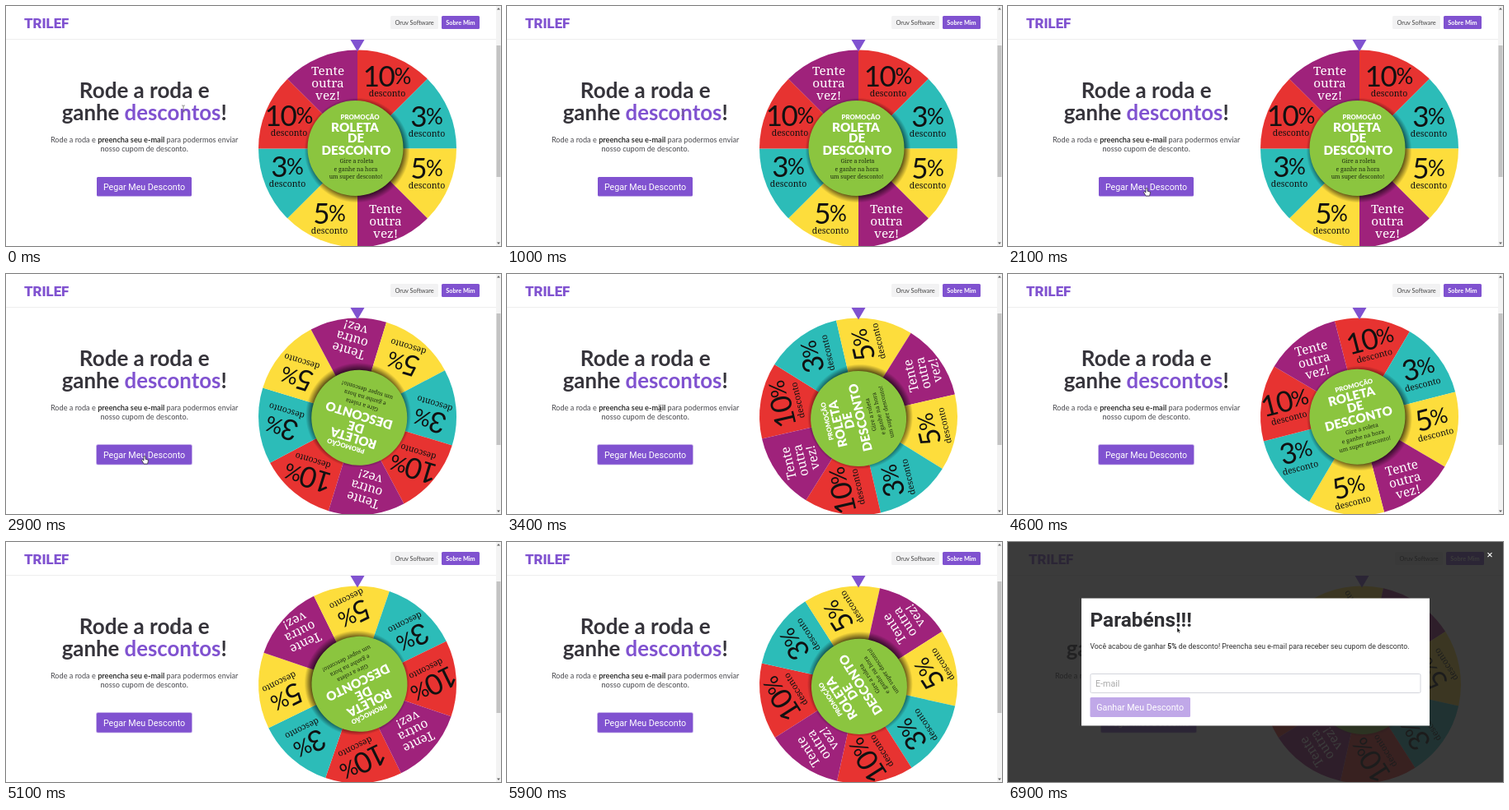
An HTML page that plays this animation: 600 px wide and 292 px high, repeating every 7000 ms.

```html
<!DOCTYPE html>
<html lang="pt-BR">
<head>
<meta charset="utf-8">
<title>Roleta de desconto</title>
<style>
  html, body { margin: 0; width: 100%; height: 100%; overflow: hidden; background: #fff; }
  svg { display: block; width: 600px; height: 292px; }
  text { white-space: pre; }
  .lato { font-family: Lato, sans-serif; }
  .roboto { font-family: Roboto, sans-serif; }
  .slab { font-family: "Noto Serif", serif; }
  .mid { text-anchor: middle; }
  .bold { font-weight: 700; }
  .black { font-weight: 900; }
</style>
</head>
<body>
<svg id="stage" viewBox="0 0 600 292"></svg>
<script>
const LOOP = 7000, MODAL_AT = 5900, MODAL_FADE = 300, CLICK_AT = 2300;
const PURPLE = '#8052d0', RED = '#e73331', TEAL = '#2cbcb8', YELLOW = '#fddd3c', PLUM = '#9f227b';
const INK = '#36343b', RADIUS = 120;

const text = (x, y, size, fill, cls, str) =>
  `<text x="${x}" y="${y}" font-size="${size}" fill="${fill}" class="${cls}">${str}</text>`;
const rect = (x, y, w, h, fill, extra = '') =>
  `<rect x="${x}" y="${y}" width="${w}" height="${h}" fill="${fill}" ${extra}/>`;

function slice(color, i) {
  const rim = a => `${RADIUS * Math.sin(a)} ${-RADIUS * Math.cos(a)}`;
  const a = i * Math.PI / 4;
  return `<path d="M0 0L${rim(a)}A${RADIUS} ${RADIUS} 0 0 1 ${rim(a + Math.PI / 4)}Z" fill="${color}"/>`;
}

const prize = (value, x, y) =>
  text(x, y, 35, '#111', 'lato mid',
    `<tspan letter-spacing="-1.5">${value}</tspan><tspan dy="-3" font-size="26">%</tspan>`) +
  text(x, y + 12, 10.5, '#111', 'slab mid', 'desconto');

const retry = (x, y) => ['Tente', 'outra', 'vez!']
  .map((word, i) => text(x, y + 15 * i, 15.3, '#fff', 'slab mid', word)).join('');

const wheel = [RED, TEAL, YELLOW, PLUM, YELLOW, TEAL, RED, PLUM].map(slice).join('') +
  prize(10, 36, -75.5) + prize(3, 84, -27) + prize(5, 84, 36) + retry(34, 78.5) +
  prize(5, -34, 91) + prize(3, -85, 34) + prize(10, -83, -28) + retry(-36, -90) +
  `<circle cx="-.5" cy="2" r="64" fill="url(#shade)"/>
   <circle cx="-2.5" cy="-.5" r="58" fill="#8bc53f"/>` +
  text(3, -35.5, 7.8, '#fff', 'lato mid black', 'PROMOÇÃO') +
  text(-3, -21, 15.2, '#fff', 'lato mid black', 'ROLETA') +
  text(-2, -7.5, 15.2, '#fff', 'lato mid black', 'DE') +
  text(-1.5, 7.5, 15.2, '#fff', 'lato mid black', 'DESCONTO') +
  text(-1, 17.5, 6.9, '#1d2a10', 'slab mid', 'Gire a roleta') +
  text(-2, 27, 6.9, '#1d2a10', 'slab mid', 'e ganhe na hora') +
  text(-2, 36.5, 6.9, '#1d2a10', 'slab mid', 'um super desconto!');

const page =
  rect(-5, 40, 610, 1, '#eee') +
  text(22, 26.5, 16.8, PURPLE, 'roboto black', 'TRILEF') +
  rect(466, 12, 58, 16, '#f2f2f3', 'rx="1.5"') +
  text(495, 22.7, 7.4, '#444', 'lato mid', 'Oruv Software') +
  rect(528, 12, 46, 16, PURPLE, 'rx="1.5"') +
  text(551, 22.7, 7.3, '#fff', 'lato mid bold', 'Sobre Mim') +
  text(167.7, 111.5, 26, INK, 'lato mid bold', 'Rode a roda e') +
  text(167.7, 139, 25.8, INK, 'lato mid bold', `ganhe <tspan fill="${PURPLE}">descontos</tspan>!`) +
  text(167.7, 166, 9.15, '#4a4a4f', 'lato mid',
    'Rode a roda e <tspan class="bold" fill="#333">preencha seu e-mail</tspan> para podermos enviar') +
  text(167.7, 177, 9.15, '#4a4a4f', 'lato mid', 'nosso cupom de desconto.') +
  `<g id="glow">${rect(109, 207, 117, 25.5, PURPLE, 'rx="2.5" opacity=".3"')}
    ${rect(109.5, 207.5, 116, 24.5, PURPLE, 'rx="2" opacity=".4"')}</g>` +
  rect(110, 208, 115, 23.5, PURPLE, 'rx="1.5"') +
  text(167.5, 223.6, 10.7, '#fff', 'roboto mid', 'Pegar Meu Desconto') +
  `<g id="wheel">${wheel}</g>
   <path d="M417.5 41h17L426 55.5Z" fill="${PURPLE}"/>`;

const scrollbar = rect(594, 0, 6, 292, '#f3f3f3') + rect(594.5, 48, 5, 160, '#c3c3c3') +
  '<path d="M595 4.5l2-2.5 2 2.5zM595 287.5l2 2.5 2-2.5z" fill="#666"/>';

const modal = rect(0, 0, 600, 292, '#1e1e1e', 'opacity=".87"') +
  '<path d="M581.5 13.2l5 5m0-5l-5 5" stroke="#fff" stroke-width="1.1"/>' +
  rect(89, 68.5, 422, 155, '#fff') +
  text(99.5, 102.5, 24.4, '#303034', 'roboto bold', 'Parabéns!!!') +
  text(99.5, 129.6, 8.75, '#333', 'roboto',
    'Você acabou de ganhar <tspan class="bold">5%</tspan> de desconto! Preencha seu e-mail para receber seu cupom de desconto.') +
  rect(100, 160.5, 400, 23, '#fff', 'rx="1.5" stroke="#d3d5dc"') +
  text(106, 176, 10.7, '#aaa', 'roboto', 'E-mail') +
  rect(99.5, 189, 121.5, 24, '#c0a8e8', 'rx="1.5"') +
  text(160.2, 204.9, 10.7, '#fff', 'roboto mid', 'Ganhar Meu Desconto');

const cursors = {
  beam: '<path d="M-1.8-4h1.3L0-3.5l.5-.5h1.3M0-3.5v7M-1.8 4h1.3L0 3.5l.5.5h1.3" fill="none" stroke="#666" stroke-width=".8"/>',
  hand: '<path d="M-1-1v5l-1.5-1.3-1 .9L-1 8h4.6l1-4.6L1 2.2V-1Q0-2-1-1Z" fill="#fff" stroke="#222" stroke-width=".7"/>',
  arrow: '<path d="M0 0v6.2l1.4-1.3.9 2.1 1-.5-.9-2h2Z" fill="#111" stroke="#fff" stroke-width=".4"/>'
};

const stage = document.getElementById('stage');
stage.innerHTML = `<defs><radialGradient id="shade">
    <stop offset=".86" stop-opacity=".65"/><stop offset="1" stop-opacity="0"/>
  </radialGradient></defs>
  <g id="page">${page}</g><g id="scrollbar">${scrollbar}</g>
  <g id="modal">${modal}</g><g id="cursor"></g>`;
const part = Object.fromEntries([...stage.querySelectorAll('g[id]')].map(g => [g.id, g]));

const clamp = v => Math.min(1, Math.max(0, v));
const smooth = (t, from, to) => { const p = clamp((t - from) / (to - from)); return p * p * (3 - 2 * p); };

// Spin as time, angle in degrees, speed in degrees per ms
const spin = [[CLICK_AT, 0, .3], [2900, 557, 1.48], [3900, 1997, 1], [4600, 2505.5, .45], [5900, 2757.5, 0]];

function spinAngle(t) {
  if (t <= spin[0][0]) return 0;
  const i = spin.findIndex(knot => knot[0] >= t);
  if (i < 0) return spin.at(-1)[1];
  const [t0, a0, v0] = spin[i - 1], [t1, a1, v1] = spin[i];
  const d = t1 - t0, p = (t - t0) / d, q = 1 - p;
  return a0 * q * q * (1 + 2 * p) + a1 * p * p * (3 - 2 * p) + d * p * q * (v0 * q - v1 * p);
}

function drawCursor(t, open) {
  const down = smooth(t, 900, 1700), up = smooth(t, 3000, 3800);
  const x = 215 - 47 * down + 35 * up + (open ? 2 : 0);
  const y = 125 + 98 * down - 119 * up;
  const overText = y < 142 || (y > 157 && y < 180);
  const kind = open ? 'arrow' : y > 207 ? 'hand' : overText ? 'beam' : 'arrow';
  part.cursor.innerHTML = cursors[kind];
  part.cursor.setAttribute('transform', `translate(${x} ${y})`);
}

function draw(now) {
  const t = Math.floor(now % LOOP / 100) * 100;
  const open = t > MODAL_AT;
  part.wheel.setAttribute('transform', `translate(426 173.5) rotate(${spinAngle(t)})`);
  part.glow.setAttribute('opacity', t >= CLICK_AT ? 1 : 0);
  part.page.setAttribute('transform', `translate(${open ? 3 : 0})`);
  part.scrollbar.setAttribute('opacity', open ? 0 : 1);
  part.modal.setAttribute('opacity', clamp((t - MODAL_AT) / MODAL_FADE));
  drawCursor(t, open);
}

const start = performance.now();
function tick() {
  draw(performance.now() - start);
  requestAnimationFrame(tick);
}
tick();
</script>
</body>
</html>
```
